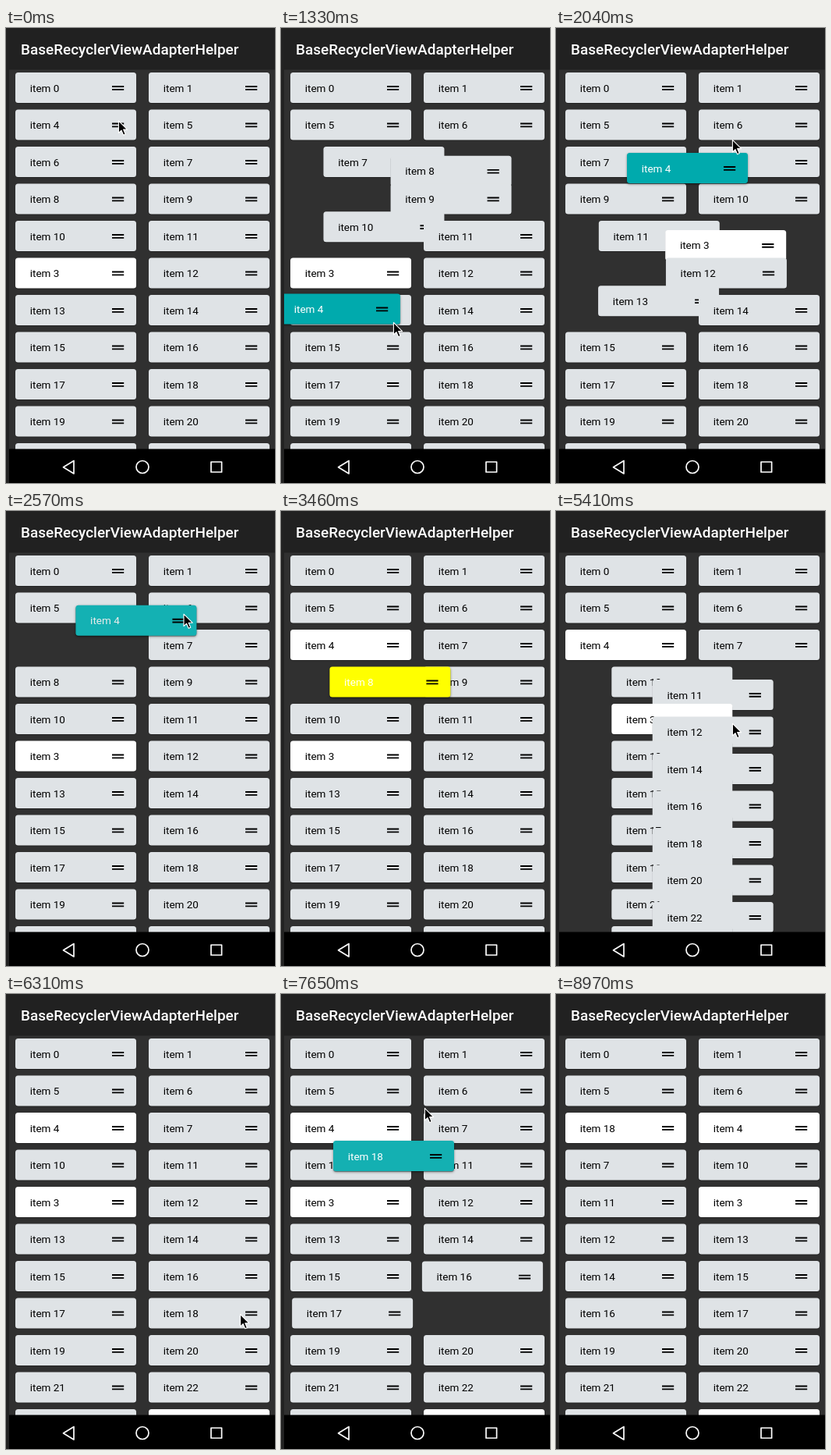
Write an HTML page that moves like this. It is 345 px wide and 583 px high and loops after 9.42 s.

```html
<!DOCTYPE html>
<html lang="en">
<head>
<meta charset="utf-8">
<title>Drag and swipe list</title>
<style>
html, body { margin: 0; width: 100%; height: 100%; overflow: hidden; background: #303030; }
svg { display: block; width: 345px; height: 583px; }
text { font-family: Roboto, sans-serif; }
.lifted { filter: drop-shadow(0 1.5px 1.5px rgba(0, 0, 0, .4)); }
</style>
</head>
<body>
<svg viewBox="0 0 345 583">
  <rect width="345" height="583" fill="#303030"/>
  <g id="list"></g>
  <rect width="345" height="53" fill="#212121"/>
  <rect y="53" width="345" height="1" fill="#000" opacity=".15"/>
  <text x="19" y="33.8" font-size="18.95" font-weight="500" fill="#fff">BaseRecyclerViewAdapterHelper</text>
  <rect y="539.4" width="345" height="44" fill="#000"/>
  <rect width="4" height="583" fill="#222"/>
  <g fill="none" stroke="#fff" stroke-width="1.7" stroke-linejoin="round">
    <path d="M87 554.5V571L73.5 562.8Z"/>
    <circle cx="175" cy="562.5" r="8"/>
    <rect x="263" y="556" width="13.6" height="13"/>
  </g>
  <path id="cursor" d="M0 0V15.6L3.6 12.2L6.2 18.3L8.8 17.2L6.2 11.2H11.2Z" fill="#000" stroke="#fff" stroke-width="1.1" stroke-linejoin="round"/>
</svg>
<script>
const LOOP = 9420, STEP = 88.8, MOVE = 250, LAG = 89, SWAP = 84, SWIPE = 291;
const GREY = [223, 227, 230], WHITE = [255, 255, 255], BLACK = [0, 0, 0], YELLOW = [255, 255, 0];
const first = [0, 1, 4, 5, 6, 7, 8, 9, 10, 11, 3];
for (let n = 12; n < 29; n++) first.push(n);

// Pointer moves: start, end, x, y
const home = [144.4, 118.9];
const moves = [
  [530, 1050, 130, 170], [1050, 1243, 130, 354.5], [1243, 1332, 144.4, 377.4], [1332, 1500, 146, 386],
  [1600, 1953, 223, 174], [1953, 2042, 226.4, 143.4], [2042, 2200, 228, 132], [2570, 3200, 110, 219],
  [3360, 3640, 228, 262], [3818, 4710, 110, 222], [4780, 5060, 226.4, 272.4],
  [5420, 6000, 329, 392], [6000, 6300, 300.5, 410.5],
  [7210, 7548, 184, 209], [7548, 7637, 184.4, 146.4], [8350, 8614, 237, 474], [8700, 8960, 300, 590]
];
// A lifted card follows the pointer with a short lag
const drags = [
  { id: 4, from: 345, drop: 2530, grip: [-132, -14], tint: [0, 170, 173] },
  { id: 18, from: 7010, drop: 7925, grip: [-117, -21], tint: [20, 176, 178] }
];
const swipes = [{ id: 8, at: 3350 }, { id: 9, at: 4770 }];

// While dragged, a card takes one new index per SWAP
const tour = (id, at, stops) => stops.map((to, i) => ({ id, to, at: at + i * SWAP }));
const reorders = [
  ...tour(4, 1081, [4, 6, 8, 10, 12]),
  ...tour(4, 1875, [10, 8, 6, 4]),
  ...swipes.map(s => ({ id: s.id, to: -1, at: s.at + 497 })),
  ...tour(18, 7619, [13, 11, 9, 7, 4])
];

const clamp = u => Math.min(1, Math.max(0, u));
const ease = u => .5 - .5 * Math.cos(Math.PI * clamp(u));
const mix = (a, b, p) => a.map((v, i) => v + (b[i] - v) * p);
const slot = i => [12 + 171 * (i % 2), 57 + 47.5 * Math.floor(i / 2)];
const rgb = c => `rgb(${c.map(Math.round)})`;
const pointer = t => moves.reduce((p, [a, b, x, y]) => mix(p, [x, y], ease((t - a) / (b - a))), home);

function make(tag, attrs, parent) {
  const el = document.createElementNS('http://www.w3.org/2000/svg', tag);
  for (const k in attrs) el.setAttribute(k, attrs[k]);
  return parent.appendChild(el);
}

const list = document.getElementById('list'), cursor = document.getElementById('cursor');
const cards = {};
for (const id of first) {
  const g = make('g', {}, list);
  make('rect', { y: 1, width: 155, height: 39, rx: 3.5, fill: '#000', opacity: .3 }, g);
  const face = make('rect', { width: 155, height: 39, rx: 3.5 }, g);
  const label = make('text', { x: 18.7, y: 24.6, 'font-size': 13.5 }, g);
  label.textContent = 'item ' + id;
  make('path', { d: 'M124 17.1h15.2v1.9h-15.2zM124 20.9h15.2v1.9h-15.2z' }, g);
  cards[id] = { g, face, label };
}

function layout(t) {
  let order = first;
  const moved = {};
  for (const { id, to, at } of reorders) {
    if (at > t) break;
    const next = order.filter(n => n !== id);
    if (to >= 0) next.splice(to, 0, id);
    next.forEach((n, i) => {
      const old = order.indexOf(n);
      if (old !== i) moved[n] = { old, at };
    });
    order = next;
  }
  const pos = {};
  order.forEach((n, i) => {
    const m = moved[n];
    pos[n] = m ? mix(slot(m.old), slot(i), ease((t - m.at) / MOVE)) : slot(i);
  });
  return { order, pos };
}

let shown = '';
function draw(t) {
  const { order, pos } = layout(t);
  const look = {};
  let top = null;
  for (const id of order) look[id] = { fill: id === 3 || id === 24 ? WHITE : GREY, ink: BLACK };

  for (const { id, from, drop, grip, tint } of drags) {
    if (t < from) continue;
    const p = ease((t - drop) / MOVE);
    const held = pointer(Math.min(t, drop) - LAG).map((v, i) => v + grip[i]);
    pos[id] = mix(held, pos[id], p);
    look[id] = { fill: mix(tint, WHITE, p), ink: mix(WHITE, BLACK, p) };
    if (p < 1) top = id;
  }
  for (const { id, at } of swipes) {
    if (t < at || !pos[id]) continue;
    pos[id][0] += 333 * clamp((t - at) / SWIPE) ** 2;
    look[id] = { fill: YELLOW, ink: WHITE };
    top = id;
  }

  const stack = order.filter(n => n !== top);
  if (top !== null) stack.push(top);
  if (stack.join() !== shown) {
    stack.forEach(n => list.appendChild(cards[n].g));
    shown = stack.join();
  }
  for (const id of first) {
    const { g, face, label } = cards[id];
    g.style.display = pos[id] ? '' : 'none';
    if (!pos[id]) continue;
    g.setAttribute('transform', `translate(${pos[id]})`);
    g.setAttribute('class', id === top ? 'lifted' : '');
    face.setAttribute('fill', rgb(look[id].fill));
    label.setAttribute('fill', rgb(look[id].ink));
  }

  const hidden = t > 8960 || swipes.some(s => t >= s.at && t < s.at + 460);
  cursor.style.display = hidden ? 'none' : '';
  cursor.setAttribute('transform', `translate(${pointer(t)})`);
}

// The picture is held for one step at a time, like a screen recording
const start = performance.now();
function tick() {
  const t = (performance.now() - start) % LOOP;
  draw(Math.floor((t + 8) / STEP) * STEP);
  requestAnimationFrame(tick);
}
tick();
</script>
</body>
</html>
```
